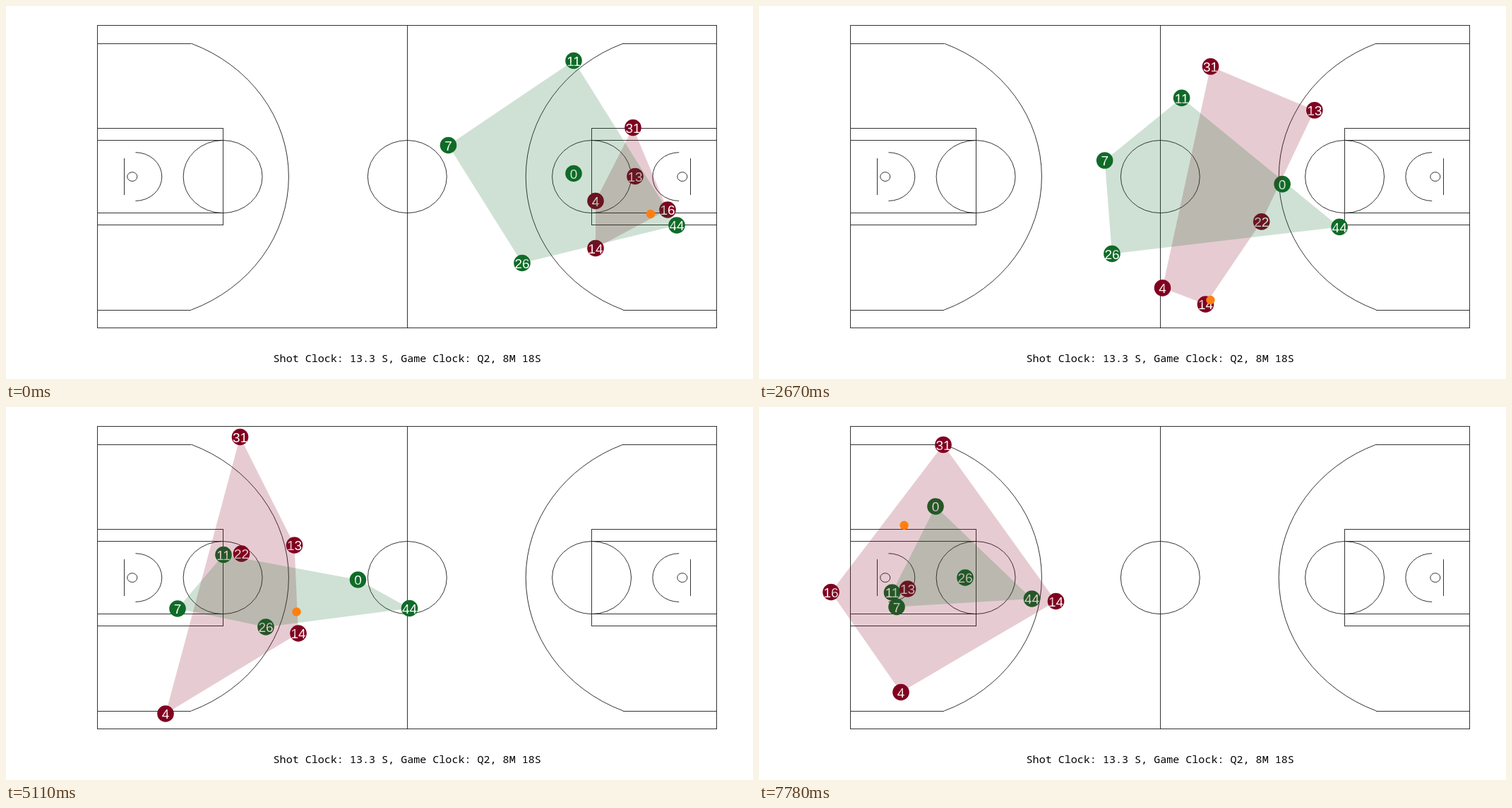
An HTML page for the animation above (8 s loop, 1058 by 529 pixels).

```html
<!DOCTYPE html>
<html lang="en">
<head>
<meta charset="utf-8">
<title>Court tracking</title>
<style>
  html, body { margin: 0; width: 100%; height: 100%; overflow: hidden; background: #fff; }
  svg { display: block; width: 1058px; height: 529px; }
  .court { fill: none; stroke: #1c1c1c; stroke-width: .9; }
  .court * { vector-effect: non-scaling-stroke; }
  .line { shape-rendering: crispEdges; }
  .hull { opacity: .2; }
  .player text { font: 19px "Liberation Sans", Arial, sans-serif; fill: #fff; text-anchor: middle; }
  .clock { font: 15.06px "Noto Sans Mono", "DejaVu Sans Mono", monospace; text-anchor: middle; }
</style>
</head>
<body>
<svg viewBox="0 0 1058 529">
  <!-- court in feet -->
  <g class="court" transform="translate(129.8 27.3) scale(9.33 8.59)">
    <rect class="line" width="94" height="50"/>
    <path class="line" d="M47 0V50"/>
    <circle cx="47" cy="25" r="6"/>
    <g id="half">
      <path class="line" d="M0 17H19V33H0M0 19H19M0 31H19M4 22V28M0 3H14.2M0 47H14.2"/>
      <circle cx="19" cy="25" r="6"/>
      <circle cx="5.25" cy="25" r=".75"/>
      <path d="M5.75 21A4 4 0 0 1 5.75 29"/>
      <path d="M14.2 3A23.75 23.75 0 0 1 14.2 47"/>
    </g>
    <use href="#half" transform="translate(94 0) scale(-1 1)"/>
  </g>
  <g id="players"></g>
  <polygon id="redHull" class="hull" fill="#800020"/>
  <polygon id="greenHull" class="hull" fill="#0f6b28"/>
  <circle id="ball" r="6.2" fill="#ff7f0e"/>
  <text class="clock" x="568.2" y="505">Shot Clock: 13.3 S, Game Clock: Q2, 8M 18S</text>
</svg>
<script>
const LOOP = 8000, STEPS = 36;
const KEYS = [0, 8, 16, 23, 35];
const GREEN = '#0f6b28', RED = '#800020';
const RIM = [178.7, 242];
const $ = id => document.getElementById(id);

function svg(tag, parent, attrs) {
  const el = document.createElementNS('http://www.w3.org/2000/svg', tag);
  for (const name in attrs) el.setAttribute(name, attrs[name]);
  return parent.appendChild(el);
}

// Cubic through the key values, with parabolic slopes
function spline(v) {
  const n = v.length - 1, m = [];
  const h = i => KEYS[i + 1] - KEYS[i];
  const d = i => (v[i + 1] - v[i]) / h(i);
  for (let i = 1; i < n; i++) {
    m[i] = (d(i - 1) * h(i) + d(i) * h(i - 1)) / (h(i - 1) + h(i));
  }
  m[0] = (3 * d(0) - m[1]) / 2;
  m[n] = (3 * d(n - 1) - m[n - 1]) / 2;

  return k => {
    let i = 0;
    while (i < n - 1 && k >= KEYS[i + 1]) i++;
    const u = (k - KEYS[i]) / h(i), w = 1 - u;
    return v[i] * w * w * (1 + 2 * u) + v[i + 1] * u * u * (3 - 2 * u)
      + h(i) * u * w * (m[i] * w - m[i + 1] * u);
  };
}

const players = [];
function player(label, color, ...points) {
  const g = svg('g', $('players'), { class: 'player' });
  svg('circle', g, { r: 11.8, fill: color });
  const text = svg('text', g, { y: 7.2 });
  text.textContent = label;
  const x = spline(points.map(p => p[0])), y = spline(points.map(p => p[1]));
  const p = { g, text, color, at: k => [x(k), y(k)] };
  players.push(p);
  return p;
}

player('11', GREEN, [804, 77.5], [713, 134], [472.5, 131.5], [308, 209.5], [188.5, 263]);
player('0', GREEN, [804, 237.5], [788, 251], [671, 251.5], [498.5, 245], [250, 141]);
player('7', GREEN, [626.5, 197.5], [577, 203], [388, 241], [243, 286], [195, 283.5]);
player('26', GREEN, [731, 364.5], [592.5, 351], [418.5, 348], [368, 312], [292, 242]);
player('44', GREEN, [950, 311], [884.5, 316.5], [743, 306.5], [571.5, 285.5], [386.5, 272]);
const wing = player('31', RED, [888, 172.5], [760.5, 119.5], [509.5, 57], [331.5, 42.5], [261, 53.5]);
player('13', RED, [891, 241.5], [888, 160], [651, 152.5], [408.5, 196], [210.5, 258]);
player('4', RED, [835, 276.5], [702, 360.5], [429, 429], [226, 435], [201, 404.5]);
const big = player('22', RED, [937, 289], [817, 345], [585, 253.5], [333.5, 208], [102, 262.5]);
const guard = player('14', RED, [835, 343.5], [723.5, 421], [538, 403], [414, 321], [420.5, 275.5]);

// Each holder keeps the ball at an offset, then it flies to the next
const holds = [
  { at: big.at, dx: -24, dy: 6, until: 7 },
  { at: guard.at, dx: 7, dy: -6, from: 10, until: 22.6 },
  { at: wing.at, dx: -15, dy: 3, from: 27, until: 32 },
  { at: () => RIM, dx: 0, dy: 0, from: 37, until: Infinity }
];

function ballAt(k) {
  const held = ({ at, dx, dy }) => {
    const [x, y] = at(k);
    return [x + dx, y + dy];
  };
  const i = holds.findIndex((hold, n) => k < hold.until || k < holds[n + 1].from);
  const a = holds[i], b = holds[i + 1];
  if (k <= a.until) return held(a);
  const u = (k - a.until) / (b.from - a.until);
  const end = held(b);
  return held(a).map((v, n) => v + (end[n] - v) * u);
}

function hull(points) {
  const sorted = points.slice().sort((a, b) => a[0] - b[0] || a[1] - b[1]);
  const cross = (o, a, b) => (a[0] - o[0]) * (b[1] - o[1]) - (a[1] - o[1]) * (b[0] - o[0]);
  const chain = list => {
    const out = [];
    for (const p of list) {
      while (out.length > 1 && cross(out[out.length - 2], out[out.length - 1], p) <= 0) out.pop();
      out.push(p);
    }
    return out.slice(0, -1);
  };
  return [...chain(sorted), ...chain(sorted.reverse())];
}

function draw(k) {
  const team = { [GREEN]: [], [RED]: [] };
  for (const p of players) {
    const pos = p.at(k);
    p.g.setAttribute('transform', `translate(${pos})`);
    team[p.color].push(pos);
  }
  big.text.textContent = k < 4 || k > 31 ? '16' : '22';
  $('greenHull').setAttribute('points', hull(team[GREEN]).join(' '));
  $('redHull').setAttribute('points', hull(team[RED]).join(' '));
  $('ball').setAttribute('transform', `translate(${ballAt(k)})`);
}

const start = performance.now();
let last = -1;
function tick() {
  const t = (performance.now() - start) % LOOP;
  const k = Math.min(STEPS - 1, Math.floor((t + 5) * STEPS / LOOP));
  if (k !== last) draw(last = k);
  requestAnimationFrame(tick);
}
tick();
</script>
</body>
</html>
```
